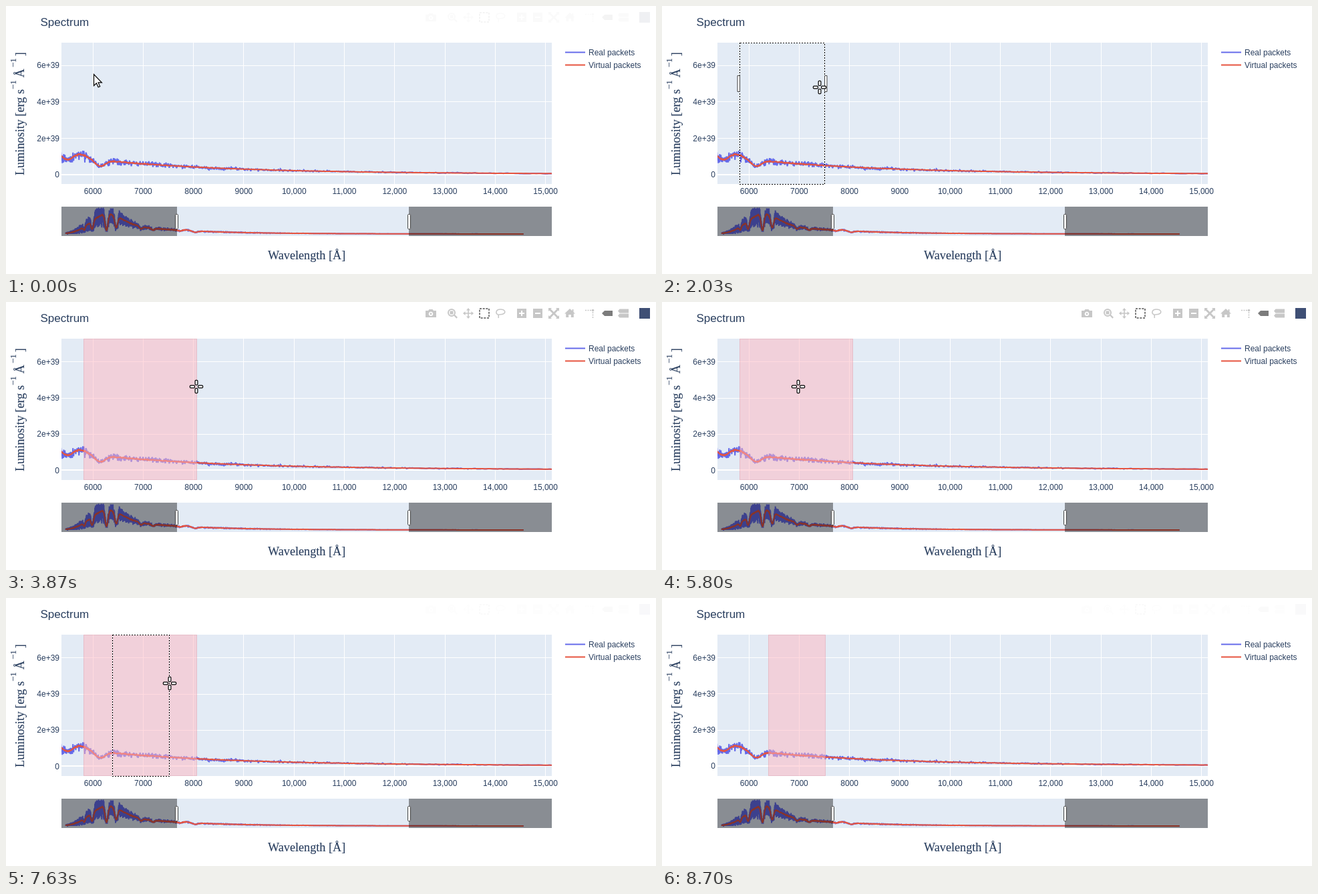
Write an HTML page that moves like this. It is 973 by 402 pixels and loops after 9560 ms.

```html
<!DOCTYPE html>
<html lang="en">
<head>
<meta charset="utf-8">
<title>Spectrum</title>
<style>
  html, body { margin: 0; width: 100%; height: 100%; overflow: hidden; background: #fff; }
  svg { display: block; }
  text { font: 12px "Liberation Sans", Arial, sans-serif; fill: #2a3f5f; }
  .title { font-size: 17px; }
  .math { font: 18.2px "Liberation Serif", "Times New Roman", serif; stroke: #2a3f5f; stroke-width: .15; }
  .sup { font-size: 13px; }
  .area { fill: #e3ebf5; }
  .grid { stroke: #fff; shape-rendering: crispEdges; }
  .line { fill: none; stroke-width: 2; stroke-miterlimit: 2; }
  .real { stroke: #646aea; }
  .virtual { stroke: #e6543f; }
  .grip { fill: #fff; stroke: #444; }
  #bar path { fill: #c7c7c7; }
  #bar .pen { fill: none; stroke: #c7c7c7; stroke-width: 2; }
  #bar .on { fill: #7c7c7c; }
  #bar .pen.on { fill: none; stroke: #7c7c7c; }
</style>
</head>
<body>
<svg width="973" height="402" viewBox="0 0 973 402">
  <defs>
    <clipPath id="plot"><rect x="83" y="55" width="734" height="212"/></clipPath>
    <clipPath id="strip"><rect x="83" y="301" width="734" height="44"/></clipPath>
  </defs>
  <rect class="area" x="83" y="55" width="734" height="212"/>
  <g id="xaxis"></g>
  <g id="yaxis"></g>
  <g clip-path="url(#plot)">
    <g id="traces">
      <path id="real" class="line real"/>
      <path id="virtual" class="line virtual"/>
    </g>
  </g>
  <rect id="band" y="55.5" height="211" fill="#ffb6c1" stroke="#ea929e" opacity=".5"/>

  <rect class="area" x="83" y="301" width="734" height="44"/>
  <g clip-path="url(#strip)">
    <path id="realMini" class="line real"/>
    <path id="virtualMini" class="line virtual"/>
  </g>
  <path d="M83 301H256V345H83ZM603 301H817V345H603Z" opacity=".4"/>
  <rect class="grip" x="253.5" y="312.5" width="4" height="22" rx="1"/>
  <rect class="grip" x="601.5" y="312.5" width="4" height="22" rx="1"/>

  <text class="title" x="51.5" y="30">Spectrum</text>
  <text class="math" x="392" y="380">Wavelength [Å]</text>
  <text class="math" transform="translate(27 254) rotate(-90)">Luminosity [erg s<tspan class="sup" dy="-12">−1</tspan><tspan dx="4" dy="12">Å</tspan><tspan class="sup" dx="2" dy="-12">−1</tspan><tspan dx="3" dy="12">]</tspan></text>
  <path class="line real" d="M837 69.5h30"/>
  <path class="line virtual" d="M837 88.5h30"/>
  <text x="872" y="74">Real packets</text>
  <text x="872" y="93">Virtual packets</text>

  <g id="bar">
    <path fill-rule="evenodd" d="M628 13h4l1.5-2h5l1.5 2h4v10h-16zM636 14.5a3.3 3.3 0 1 0 .01 0zM636 16.3a1.5 1.5 0 1 1-.01 0z"/>
    <circle class="pen" cx="667" cy="16" r="5"/>
    <path d="M664.5 13.5h5v5h-5zM670 20l1.5-1.5 4.5 4.5-1.7 1.7z"/>
    <path d="M692 9l3 3.5h-2.2v3.7h3.7V14l3.5 3-3.5 3v-2.2h-3.7v3.7h2.2l-3 3.5-3-3.5h2.2v-3.7h-3.7V20l-3.5-3 3.5-3v2.2h3.7v-3.7H689z"/>
    <rect class="pen on" x="709" y="10" width="14" height="14" stroke-dasharray="3 1.667"/>
    <path class="pen" d="M737 19c-5-1-4-8 3-8s9 5 4 7c-3 1.5-7 0-7 2 0 1.5 1 2 0 4" style="stroke-width:1.6"/>
    <path fill-rule="evenodd" d="M765 10h14v14h-14zM771 13v3h-3v2h3v3h2v-3h3v-2h-3v-3z"/>
    <path fill-rule="evenodd" d="M789 10h14v14h-14zM792 16v2h8v-2z"/>
    <path d="M812 9h5l-1.5 1.5 4.5 4.5 4.5-4.5L823 9h5v5l-1.5-1.5L822 17l4.5 4.5L828 20v5h-5l1.5-1.5L820 19l-4.5 4.5L817 25h-5v-5l1.5 1.5L818 17l-4.5-4.5L812 14z"/>
    <path d="M844 10l3.5 3.3V11h2v4l2.5 2.5h-2.2V23h-4v-4h-3.6v4h-4v-5.5H836z"/>
    <path class="pen" d="M867 12.5h9M878.5 15v9" stroke-dasharray="2 1.5" style="stroke-width:1.5"/>
    <circle cx="878.5" cy="12.5" r="1.8" fill="#c7c7c7"/>
    <path class="on" d="M892 17l4-4h12v8h-12z"/>
    <path d="M916 13.5l2.5-3H932v6h-13.5zM916 20.5l2.5-3H932v6h-13.5z"/>
    <rect x="948" y="9" width="16" height="16" fill="#3f4f75"/>
  </g>

  <g id="drag" fill="none" shape-rendering="crispEdges">
    <path class="box" stroke="#fff"/>
    <path class="box" stroke="#000" stroke-dasharray="2 2"/>
  </g>
  <path id="corners" class="grip"/>
  <path id="arrow" d="M131.5 102.5v17l3.9-3.7 2.7 6 2.6-1.2-2.6-5.7h5.3z" fill="#fff" stroke="#000" stroke-width="1.2"/>
  <g id="cross" fill="#fff" stroke="#000" stroke-width="1.2"></g>
</svg>
<script>
const LOOP = 9560;
const $ = id => document.getElementById(id);
const show = (el, on) => { el.style.display = on ? "" : "none"; };
const ramp = (a, b, t) => Math.min(1, Math.max(0, (t - a) / (b - a)));
const smooth = f => f * f * (3 - 2 * f);
const bell = (x, centre, width) => Math.exp(-(((x - centre) / width) ** 2));

function add(parent, tag, attrs, text) {
  const el = document.createElementNS("http://www.w3.org/2000/svg", tag);
  for (const k in attrs) el.setAttribute(k, attrs[k]);
  if (text) el.textContent = text;
  return parent.appendChild(el);
}

// Axes
for (let k = 6; k <= 15; k++) {
  const x = 130.15 + 75.27 * (k - 6);
  add($("xaxis"), "path", { class: "grid", d: `M${x} 55V267` });
  add($("xaxis"), "text", { x, y: 282, "text-anchor": "middle" }, k < 10 ? `${k}000` : `${k},000`);
}
const ticks = [0, 2, 4, 6].map(n => ({
  n,
  grid: add($("yaxis"), "path", { class: "grid", d: "M83 0H817", "stroke-width": n ? 1 : 2 }),
  text: add($("yaxis"), "text", { x: 80, "text-anchor": "end" }, n ? `${n}e+39` : "0")
}));

// Wavelength (Å) to x in the strip, and from there to x in the main plot
const stripX = wave => 83 + (wave - 513) * 0.03558;
const mainX = x => 83 + (x - 256) * 734 / 347;

// Absorption lines in the strip: centre, width, depth (below 0: emission)
const lines = [
  [117, 2, 0.45], [129, 2.5, 0.65], [150.5, 3, 0.8], [165, 3, 0.65], [202, 3, 0.3],
  [220, 3, 0.3], [260.5, 4, 0.2], [270, 6, -0.2], [283.5, 5, 0.42]
];

// Black body with an ultraviolet hump, cut by the lines
const planck = wave => (5375 / wave) ** 5 * 18.57 / Math.expm1(15987 / wave);
function mean(wave) {
  const x = stripX(wave);
  const base = 29 * planck(wave) + 105 * bell(x, 148, 34);
  return lines.reduce((h, [c, w, depth]) => h * (1 - depth * bell(x, c, w)), base);
}

let seed = 20117;
const rand = () => (seed = (seed * 16807) % 2147483647) / 2147483647;
const noise = () => (rand() + rand() + rand() - 1.5) * 2;

// Bins are even in frequency, so the points thin out to the right
const points = { real: [], virtual: [], realMini: [], virtualMini: [] };
function plot(name, x, h) {
  if (x > 254 && x < 608) points[name].push(`${mainX(x).toFixed(1)} ${(-h).toFixed(1)}`);
  points[name + "Mini"].push(`${x.toFixed(2)} ${(342.1 - h * 0.2075).toFixed(2)}`);
}
for (let f = 1 / 700; f > 1 / 20000; f -= 1.95e-7) {
  const wave = 1 / f, x = stripX(wave), h = mean(wave);
  const spread = 0.1 + 320 / wave;
  plot("real", x, Math.min(186, Math.max(0, h * (1 + spread * noise()))));
  plot("virtual", x, h * (1 + 0.02 * noise()));
}
for (const name in points) $(name).setAttribute("d", "M" + points[name].join("L"));

for (const a of [0, 90, 180, 270]) {
  add($("cross"), "rect", { x: 2.6, y: -1.9, width: 7, height: 3.8, rx: 1.2, transform: `rotate(${a})` });
}

// Hand movements: start and end in ms, then where they lead
const moves = [
  [30, 900, 117, 117], [1400, 2290, 285, 127], [4100, 4500, 167, 130], [4700, 4900, 159, 131],
  [5480, 6300, 275, 127], [6450, 6730, 245, 128], [8270, 8400, 262, 14]
];
function pointer(t) {
  let x = 131, y = 104;
  for (const [a, b, toX, toY] of moves) {
    const f = ramp(a, b, t);
    x += (toX - x) * f;
    y += (toY - y) * f - 3 * Math.sin(Math.PI * f);
  }
  return [Math.round(x), Math.round(y)];
}

// The toolbar fades in while the plot is hovered
const hovers = [[-50, 1700], [2650, 5820], [7600, 8430]];
const barOpacity = t => hovers.reduce(
  (sum, [a, b]) => sum + smooth(ramp(a, a + 300, t)) - smooth(ramp(b, b + 300, t)), 0);

const drags = [
  { from: 1700, release: 2670, until: 3400, x: 116.5, y: 117, end: 285.5 },
  { from: 5830, release: 7630, until: 8400, x: 159.5, y: 130, end: 244.5 }
];

// The y axis refits after each selection: time, zero line, step
const scales = [[0, 253, 54.6], [3870, 252.4, 54.2], [8700, 252.15, 54.1]];

function draw(t) {
  const [, zero, step] = scales.filter(s => s[0] <= t).pop();
  $("traces").setAttribute("transform", `translate(0 ${zero})`);
  for (const { n, grid, text } of ticks) {
    const y = zero - n / 2 * step;
    grid.setAttribute("transform", `translate(0 ${y})`);
    text.setAttribute("y", y + 4.2);
  }

  const chosen = drags.filter(s => s.until <= t).pop();
  show($("band"), chosen);
  if (chosen) {
    $("band").setAttribute("x", chosen.x);
    $("band").setAttribute("width", chosen.end - chosen.x);
  }

  const drag = drags.find(s => t >= s.from && t < s.until);
  show($("drag"), drag);
  show($("corners"), drag && t < drag.release);
  if (drag) {
    const right = t < drag.release ? pointer(t + 38)[0] + 0.5 : drag.end;
    for (const el of document.querySelectorAll(".box")) {
      el.setAttribute("d", `M${drag.x} 55.5H${right}V267H${drag.x}Z`);
    }
    const top = drag.y - 12.5;
    $("corners").setAttribute("d", `M${drag.x} ${top}h-3.5v24h3.5zM${right} ${top}h3.5v24h-3.5z`);
  }

  show($("arrow"), t < 30);
  show($("cross"), t >= 30 && t < 8400);
  $("cross").setAttribute("transform", `translate(${pointer(t)})`);
  $("bar").setAttribute("opacity", barOpacity(t));
}

const start = performance.now();
function tick() {
  draw((performance.now() - start) % LOOP);
  requestAnimationFrame(tick);
}
tick();
</script>
</body>
</html>
```
